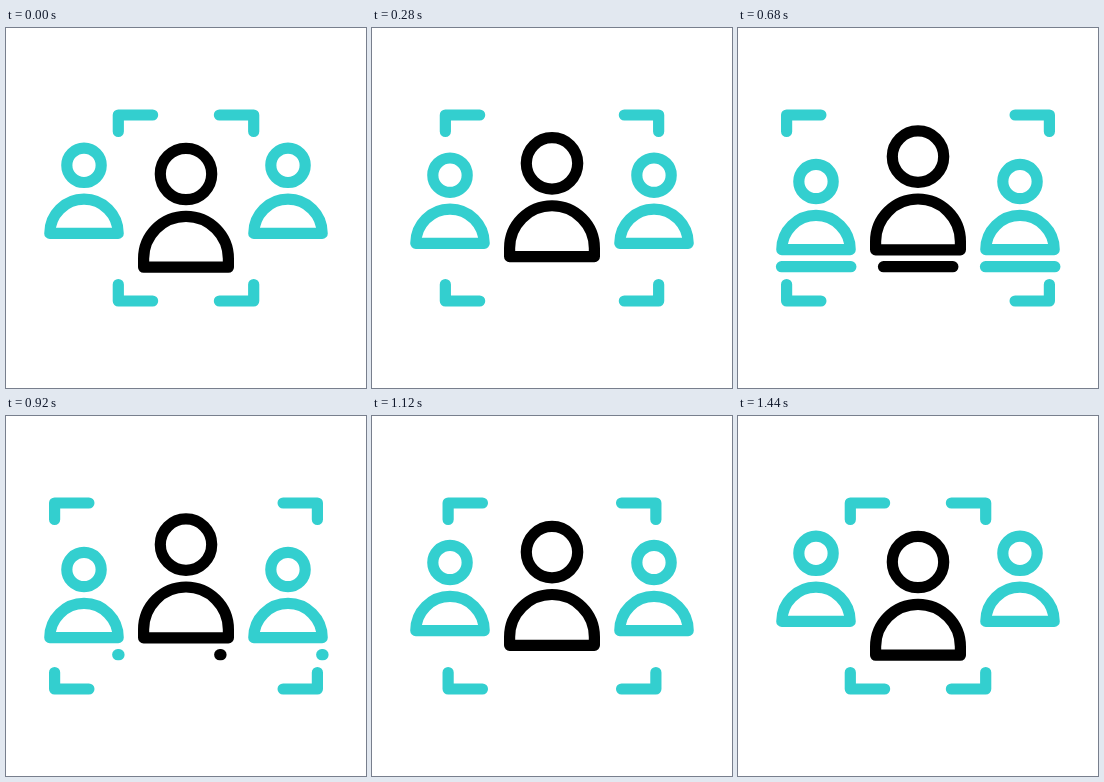
Recreate the animation shown at these times as an HTML page with a canvas. Size 360 by 360 pixels, loop 1.48 s.

```html
<!DOCTYPE html>
<html lang="en">
<head>
<meta charset="utf-8">
<title>Focus on a person</title>
<style>
  html, body { margin: 0; width: 100%; height: 100%; overflow: hidden; background: #fff; }
  canvas { display: block; width: 100vw; height: 100vh; object-fit: contain; }
</style>
</head>
<body>
<canvas id="stage" width="360" height="360"></canvas>
<script>
const ctx = document.getElementById('stage').getContext('2d');
const LOOP = 1480, STEP = 40;
const TEAL = '#33cfcf', BLACK = '#000';

// Cubic bezier easing (0.27, 0, 0.5, 1), solved by bisection.
function ease(x) {
  if (x <= 0) return 0;
  if (x >= 1) return 1;
  let lo = 0, hi = 1, u = 0.5;
  for (let i = 0; i < 24; i++) {
    u = (lo + hi) / 2;
    const v = 1 - u;
    const at = 3 * v * v * u * 0.27 + 3 * v * u * u * 0.5 + u * u * u;
    if (at < x) lo = u; else hi = u;
  }
  return u * u * (3 - 2 * u);
}

const tween = (t, start, end) => ease((t - start) / (end - start));

function strokePath(color, build) {
  ctx.strokeStyle = color;
  ctx.beginPath();
  build();
  ctx.stroke();
}

function person(color, x, headY, headR, shoulderY, baseY, bodyR) {
  strokePath(color, () => ctx.arc(x, headY, headR, 0, Math.PI * 2));
  strokePath(color, () => {
    ctx.moveTo(x - bodyR, baseY);
    ctx.lineTo(x - bodyR, shoulderY);
    ctx.arc(x, shoulderY, bodyR, Math.PI, 0);
    ctx.lineTo(x + bodyR, baseY);
    ctx.closePath();
  });
}

// One corner of the viewfinder; sx and sy choose the quadrant.
function corner(sx, sy, reach) {
  const x = 180 + sx * reach, y = 180 + sy * 93;
  strokePath(TEAL, () => {
    ctx.moveTo(x - sx * 34.3, y);
    ctx.lineTo(x, y);
    ctx.lineTo(x, y - sy * 16.5);
  });
}

function underline(color, x, from, to) {
  const left = x - 34.5, length = 69.5;
  strokePath(color, () => {
    ctx.moveTo(left + length * from, 238.7);
    ctx.lineTo(left + length * to, 238.7);
  });
}

function draw(t) {
  const open = tween(t, 120, 450) - tween(t, 930, 1440);
  const from = tween(t, 690, 950), to = tween(t, 430, 690);

  ctx.fillStyle = '#fff';
  ctx.fillRect(0, 0, 360, 360);
  ctx.lineWidth = 11.2;
  ctx.lineCap = ctx.lineJoin = 'round';

  for (const sx of [-1, 1])
    for (const sy of [-1, 1]) corner(sx, sy, 67.7 + 63.7 * open);

  const drop = 16.2 * open, rise = 17.4 * open;
  for (const x of [78, 282])
    person(TEAL, x, 137.3 + drop, 17.2, 205.4 + drop, 205.4 + drop, 34.2);
  person(BLACK, 180, 146 - rise, 25.7, 230.8 - rise, 239.2 - rise, 42.4);

  if (to > from) {
    underline(TEAL, 78, from, to);
    underline(BLACK, 180, from, to);
    underline(TEAL, 282, from, to);
  }
}

const origin = performance.now();
function tick() {
  const t = (performance.now() - origin) % LOOP;
  draw(Math.floor(t / STEP) * STEP);
  requestAnimationFrame(tick);
}
tick();
</script>
</body>
</html>
```
